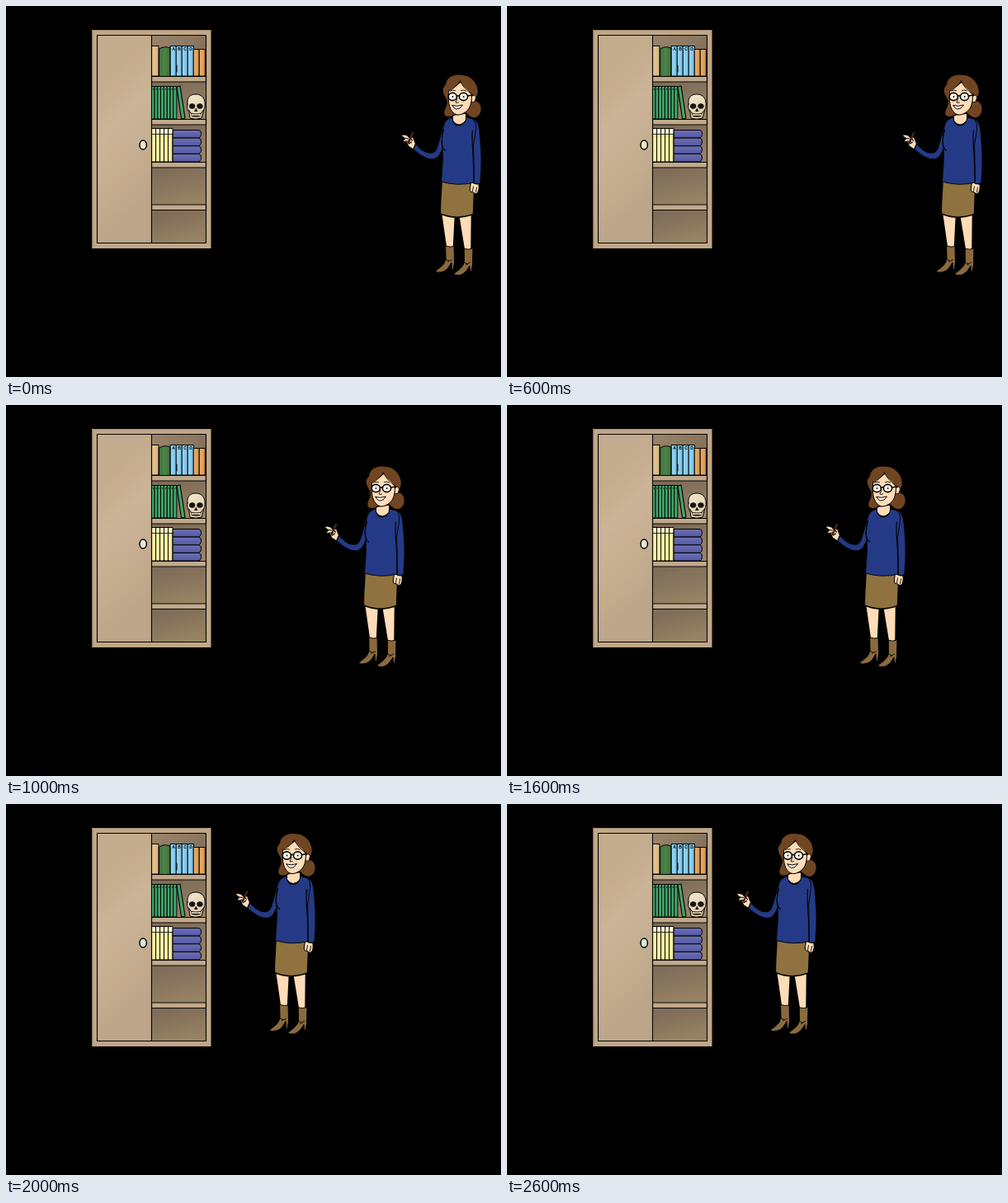
These frames come from a looping animation (600x450 px, 3 s). An HTML page with a canvas:

```html
<!DOCTYPE html>
<html lang="en">
<head>
<meta charset="utf-8">
<title>Cabinet</title>
<style>
html, body { margin: 0; width: 100%; height: 100%; overflow: hidden; background: #000; }
canvas { display: block; width: 600px; height: 450px; }
</style>
</head>
<body>
<canvas id="stage" width="600" height="450"></canvas>
<script>
const ctx = document.getElementById('stage').getContext('2d');
const INK = '#050403', SKIN = '#ffdcb8', HAIR = '#704522', SWEATER = '#243a86';
const SKIRT = '#8f723f', BOOT = '#8a6a3d';

const POSES = [
  { x: -0.5, y: 0, knob: '#eee4c9' },
  { x: -93.5, y: -9, knob: '#e8eadd' },
  { x: -201.5, y: -47.5, knob: '#d5e9dc' }
];

function shape(d, fill, width = 1.5, stroke = INK) {
  const path = new Path2D(d);
  if (fill) { ctx.fillStyle = fill; ctx.fill(path); }
  if (width) { ctx.lineWidth = width; ctx.strokeStyle = stroke; ctx.stroke(path); }
}

function line(d, width = 1.2, stroke = INK) { shape(d, null, width, stroke); }

function box(x, y, w, h, fill, width = 1) {
  ctx.fillStyle = fill;
  ctx.fillRect(x, y, w, h);
  if (width) {
    ctx.lineWidth = width;
    ctx.strokeStyle = INK;
    ctx.strokeRect(x, y, w, h);
  }
}

function oval(x, y, rx, ry, fill, width = 1.2, tilt = 0) {
  ctx.beginPath();
  ctx.ellipse(x, y, rx, ry, tilt, 0, Math.PI * 2);
  if (fill) { ctx.fillStyle = fill; ctx.fill(); }
  if (width) { ctx.lineWidth = width; ctx.strokeStyle = INK; ctx.stroke(); }
}

function gradient(x0, y0, x1, y1, ...colors) {
  const g = ctx.createLinearGradient(x0, y0, x1, y1);
  colors.forEach((c, i) => g.addColorStop(i / (colors.length - 1), c));
  return g;
}

function drawBooks() {
  box(177, 48.5, 8, 36.5, gradient(177, 0, 185, 0, '#e9c993', '#d5b17c'));
  shape('M185.5 85V52Q192 48 199 51V85Z', gradient(185, 0, 199, 0, '#3e7040', '#4c8448', '#3e7040'), 1);
  ctx.font = 'bold 5px Arial, "Liberation Sans", sans-serif';
  ctx.textAlign = 'center';
  [...'ABCD'].forEach((letter, i) => {
    const x = 199.5 + i * 7;
    box(x, 48.5, 7, 36.5, gradient(x, 0, x + 7, 0, '#9ad9f8', '#72bde6'));
    ctx.fillStyle = INK;
    ctx.fillText(letter, x + 3.5, 53.5);
  });
  line('M207 72V80', 1);
  for (const x of [227.5, 234.5])
    box(x, 52.5, 6.8, 32.5, gradient(x, 0, x + 7, 0, '#edae65', '#d69450'));

  for (let i = 0; i < 8; i++) {
    const x = 176.5 + i * 3.8;
    box(x, 97.5, 3.8, 39.5, '#42a56b');
    box(x + 1.4, 100, 1, 2, '#17432b', 0);
  }
  shape('M207 98L211 97L217 136L212.5 137Z', '#42a56b', 1.2);

  for (let i = 0; i < 5; i++) {
    const x = 177 + i * 5;
    box(x, 148.5, 5, 40.5, gradient(x, 0, x + 5, 0, '#fff9ae', '#ece18c'));
    box(x + 1, 149.5, 3.4, 5, '#fff8dc', 0);
    line(`M${x} 155.5h5`, 0.8);
  }
  for (let i = 0; i < 4; i++) {
    const y = 150.5 + i * 9.65;
    shape(`M202.5 ${y}H234Q237 ${y + 1} 236.5 ${y + 5}T234 ${y + 9.5}H202.5Z`,
      gradient(0, y, 0, y + 9.5, '#6c70b5', '#5559a3'), 1);
  }
}

function drawSkull() {
  shape('M220 119C219 110 224 107 230 107C237 107 242 112 241 121C241 125 239 126 239 129L237 136Q230 138.5 223 136L222 129C220.5 126 219 124 220 119Z',
    gradient(220, 107, 241, 137, '#f4e8ce', '#d8c8a6'), 1);
  oval(225.6, 121.5, 3.7, 3.3, '#19130d', 0, 0.2);
  oval(235, 121.5, 3.7, 3.3, '#19130d', 0, -0.2);
  shape('M230.3 123.5L228 128H232.5Z', '#19130d', 0);
  line('M221.5 126L224 130M239.5 126L236.5 130', 1);
  shape('M224 129.5Q230 131.5 237 129.5L235.5 134Q230 135.5 225 134Z', '#2a2117', 0);
  line('M226 132H235', 2, '#eadfc4');
  line('M228 131V133M230.3 131V133M232.6 131V133', 0.5);
}

function drawCabinet(knob) {
  box(104.5, 29, 144, 265, '#bfa789', 0);
  line('M105 29.5H248M105 29V294', 1, '#ac9477');
  const inside = gradient(177, 36, 242, 92, '#99846b', '#8c7861', '#706050');
  [[36, 49], [92, 45], [144, 45], [196, 45], [248, 39]].forEach(([y, h], i) => {
    const tone = i ? gradient(205, y, 215, y + h, '#7f6c58', '#8b775e', '#988362') : inside;
    box(176.5, y, 66, h, tone, 0);
  });
  drawBooks();
  drawSkull();
  for (const y of [85.5, 137.5, 189.5, 241])
    box(176.5, y, 66, 6.5, '#c1a98b', 1.2);
  box(110.5, 35.5, 66, 252, gradient(95, 110, 195, 215, '#c3ab8d', '#cbb497', '#c5ad90', '#bca588'), 0);
  line('M110.5 35.5H242.5V287.5H110.5ZM176.5 36V287', 1.1);
  oval(166.2, 168.5, 4.2, 5.5, knob, 1.5);
}

function drawLegs() {
  shape('M528 251L534 293H543L545 253Z', SKIN);
  shape('M549 253L556 296H564.5L565 251Z', SKIN);
  shape('M533.5 291Q539 293 543.5 291.5L544 311L542.5 320H541L540.5 311C537 317 535 321 529 322.5Q524 324 520.5 322C525 318 532 315 533.5 307Z', BOOT, 1);
  shape('M556 294.5Q561 296 566.5 294L566 314L564.5 322H563L562.5 315C559 321 556 325 550 326.5Q545 327 543 325C549 320 555 317 556 310Z', BOOT, 1);
  line('M533 307l4 2M536 310l5-2M556 311l4 2M558 314l5-3', 0.9);
}

function drawBody() {
  shape('M542 127L542 139Q549 149 558 139L558 126Z', SKIN, 1);
  shape('M528.5 213C528 230 526.5 240 527 252Q546 260 567 252.5L568.5 213Z', SKIRT);

  // Resting hand and sleeve
  shape('M564 213L573 214Q575 222 572 227Q569 229 567 226Q562 226 563 221Z', SKIN, 1.1);
  line('M567 219l-1 6M571 220l-1 6', 0.9);
  shape('M566 137C573 138 574.5 145 575.5 160C577.5 180 577 200 575.5 215Q570 217 566 214L566 160Z', SWEATER);

  // Raised sleeve
  shape('M534 138C529 142 529 152 526 161C523 171 522 178 516 178C509 179 503 173 497 167L494 174C502 181 510 187 518 186C525 186 528 178 533 166Z', SWEATER);
  shape('M541.5 135Q533 137 531 145C529 154 529 158 529 166C531 180 529 199 528 213Q548 219 568 214C567 199 568 183 567 170L570 150Q571 140 566 137L558.5 135Q557 145 549.5 145Q542 145 541.5 135Z', SWEATER, 1);
  line('M531 150C528 162 527 171 533 175M566 151C564 164 568 180 567.5 214', 1.2);
}

function drawHand() {
  shape('M497 167L494 174L488 170L486 165L481 164L484 161L479.5 157Q481 155 487 157L490 160L494 159Z', SKIN, 1.2);
  line('M488 166L493.5 154', 2.2, '#4c2914');
  line('M481 160l7 1M485 164l5 0M490 160l3 3M489 167l3-2', 1.2);
}

function drawHead() {
  shape('M552 83C543 82 534 86 533 95C527 101 530 107 534 113C538 122 528 125 532 133Q538 137 544 132L558 130Q567 140 574 133C579 126 577 117 570 115L573 105C573 93 564 83 552 83Z', HAIR, 1.3);
  oval(567, 112.5, 2.8, 4.4, SKIN, 1, 0.2);
  shape('M537.5 101C536 113 536.5 125 544 130.5Q549 134 556 129.5C562 126 565 120 565 108Q561 99 552 92Q546 98 537.5 101Z', SKIN, 1);
  shape('M551 91C547 97 542 101 535 103Q532 98 537 90Q547 82 551 91Z', HAIR, 0);
  shape('M550 89C553 97 560 101 566 108L571 107Q572 94 562 87Z', HAIR, 0);
  line('M551 91Q546 99.5 537 103M551 91Q554 99 566 108', 0.9);
  for (const x of [541.8, 555]) {
    oval(x, 110, 5.1, 4.6, '#faf6ed', 1.6);
    oval(x + 0.2, 110, 0.9, 1.1, INK, 0);
  }
  line('M547 109.5Q548.5 108 550 109.5M560 109L566 108', 1.4);
  line('M539 103Q542 101.5 545 102.5M552 102.5Q555 101 558 103', 0.9);
  line('M547.5 112L545.5 117Q547 118 549 117', 0.9);
  shape('M541.5 120.5Q547 122.5 554 120Q551 125.5 546 125Q543 124 541.5 120.5Z', '#fff', 1);
}

function drawWoman({ x, y }) {
  ctx.save();
  ctx.translate(x, y);
  drawLegs();
  drawBody();
  drawHand();
  drawHead();
  ctx.restore();
}

function render(now) {
  const pose = POSES[Math.floor(now % 3000 / 1000)];
  ctx.fillStyle = '#000';
  ctx.fillRect(0, 0, 600, 450);
  drawCabinet(pose.knob);
  drawWoman(pose);
}

ctx.lineJoin = ctx.lineCap = 'round';
const start = performance.now();
function tick() {
  render(performance.now() - start);
  requestAnimationFrame(tick);
}
tick();
</script>
</body>
</html>
```
